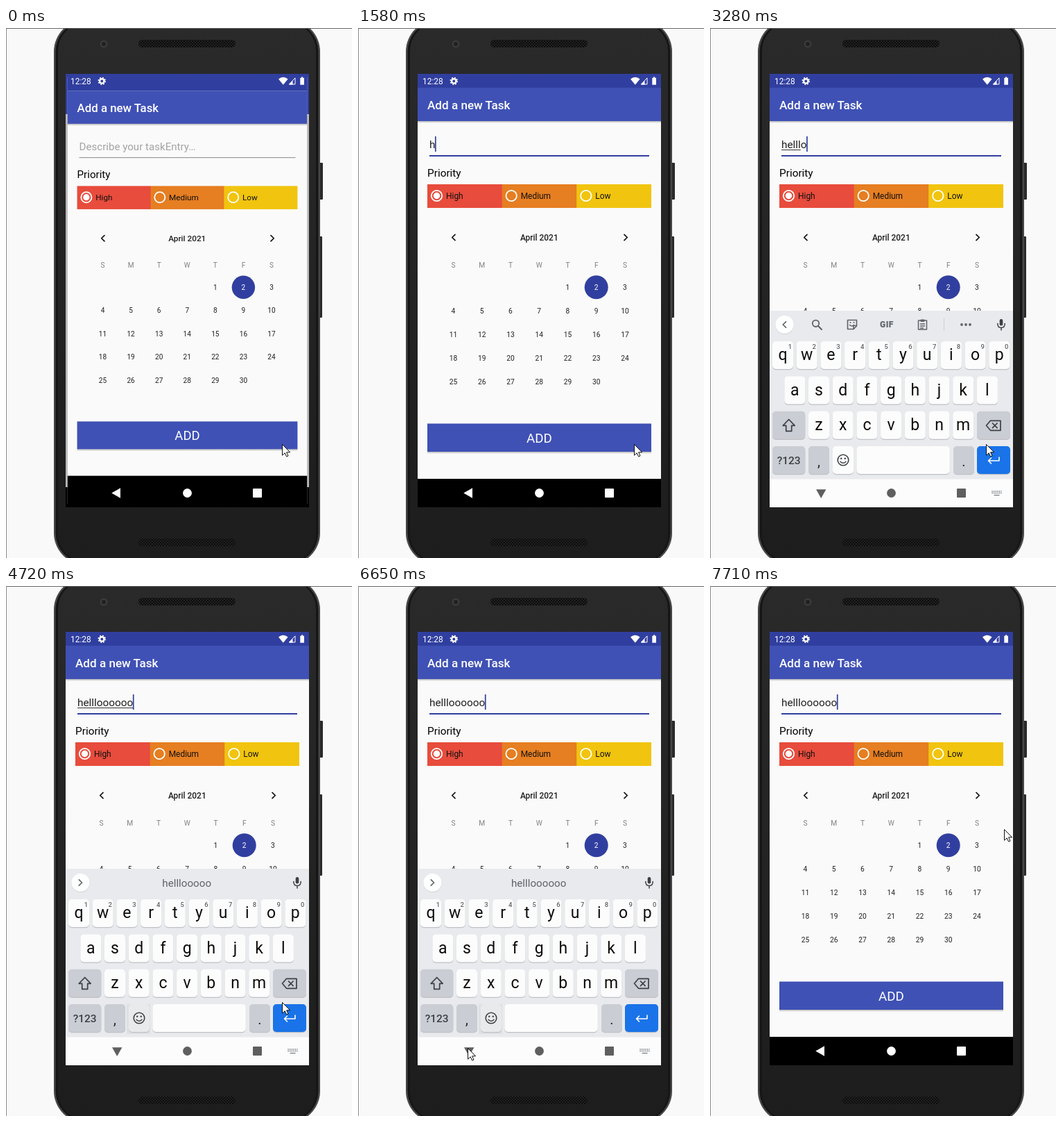
Animation of 499 by 763 pixels, one loop 8 s. Source, as an HTML page:

```html
<!DOCTYPE html>
<html lang="en">
<head>
<meta charset="utf-8">
<title>Add a new Task</title>
<style>
html, body { margin: 0; width: 100%; height: 100%; overflow: hidden; background: #f9f9f9; }
svg { display: block; width: 499px; height: 763px; }
text { font-family: Roboto, sans-serif; white-space: pre; }
.line { fill: none; stroke-linecap: round; stroke-linejoin: round; }
</style>
</head>
<body>
<svg id="stage" viewBox="0 0 499 763" xmlns="http://www.w3.org/2000/svg"></svg>
<script>
const LOOP = 8000;
const WORD = 'helll' + 'o'.repeat(6);
const DP = 351 / 411;
const INK = '#5f6368';

// Step tables: [start ms, value, ...]
const typed = [[0, 0], [1580, 1], [1720, 2], [2120, 3], [2390, 4], [2850, 5], [3280, 6],
  [3730, 7], [4010, 8], [4290, 9], [4440, 10], [4720, 11]];
const zoom = [[0, .984], [130, .995], [250, 1]];
const keyboard = [[0, 0, 0], [2850, 28, .45], [2980, 4, .92], [3130, 0, 1],
  [6780, 28, .58], [6930, 45, .12], [7060, 0, 0]];
const backTurn = [[0, 0], [1720, -20], [1850, -45], [2120, -70], [2250, -90],
  [6780, -75], [6930, -35], [7060, 0]];
const caretOn = [[0, 0], [1580, 1], [5150, 0], [5670, 1], [6150, 0], [6650, 1], [7130, 0], [7590, 1]];
const pointer = [[0, 398, 599], [4870, 440, 585], [5000, 484, 558], [5130, 470, 562],
  [5270, 400, 582], [5400, 320, 606], [5540, 240, 630], [5670, 185, 643], [5940, 178, 654],
  [6080, 164, 662], [6240, 158, 665], [7060, 190, 640], [7190, 250, 560], [7330, 325, 470],
  [7460, 392, 400], [7590, 424, 367], [7710, 424, 350]];

const at = (table, t) => table.findLast(([start]) => start <= t)?.slice(1) ?? table[0].slice(1);

const rect = (x, y, w, h, fill, rx = 0, more = '') =>
  `<rect x="${x}" y="${y}" width="${w}" height="${h}" rx="${rx}" fill="${fill}" ${more}/>`;
const disc = (x, y, r, fill, more = '') => `<circle cx="${x}" cy="${y}" r="${r}" fill="${fill}" ${more}/>`;
const ring = (x, y, r, color, width, more = '') =>
  disc(x, y, r, 'none', `stroke="${color}" stroke-width="${width}" ${more}`);
const shape = (d, fill, more = '') => `<path d="${d}" fill="${fill}" ${more}/>`;
const line = (d, color = INK, width = 1.7, more = '') =>
  `<path class="line" d="${d}" stroke="${color}" stroke-width="${width}" ${more}/>`;
const text = (x, y, size, fill, str, more = '') =>
  `<text x="${x}" y="${y}" font-size="${size}" fill="${fill}" ${more}>${str}</text>`;
const mid = (x, y, size, fill, str, more = '') => text(x, y, size, fill, str, `text-anchor="middle" ${more}`);
const medium = 'font-weight="500"';
const group = (id, body, more = '') => `<g id="${id}" ${more}>${body}</g>`;

function phone() {
  const speaker = y => rect(191, y, 140, 11, '#0d0d0d', 5.5) + rect(191, y, 140, 11, 'url(#mesh)', 5.5);
  return rect(452, 194, 5, 53, '#2b2b2b', 1) + rect(452, 300, 4, 117, '#2b2b2b', 1) +
    rect(69, -12, 384, 785, '#474747', 46) + rect(71.5, -10, 379, 781, '#161616', 44) +
    rect(75, -8, 372, 777, 'url(#body)', 41) +
    disc(141, 23, 5.5, '#3b3b3b') + disc(141, 23, 3, '#202024') +
    speaker(17) + speaker(735);
}

function calendar() {
  const col = i => 137.5 + 41.25 * i;
  let out = line('M140 297.3l-4.3 4.2 4.3 4.2', '#111') + line('M384 297.3l4.3 4.2-4.3 4.2', '#111') +
    mid(261.3, 305.5, 14 * DP, '#212121', 'April 2021', medium) +
    disc(343.7, 373.2, 17, '#303f9f');
  [...'SMTWTFS'].forEach((d, i) => out += mid(col(i), 344.5, 12 * DP, '#808080', d));
  for (let day = 1; day <= 30; day++) {
    const cell = day + 3;
    out += mid(col(cell % 7), 377 + 34 * Math.floor(cell / 7), 12 * DP, day === 2 ? '#fff' : '#212121', day);
  }
  return out;
}

function priorities() {
  const w = 323 / 3;
  return [['High', '#e74c3c'], ['Medium', '#e67e22'], ['Low', '#f1c40f']].map(([name, color], i) => {
    const x = 100 + w * i;
    return rect(x, 225, w + (i < 2 ? .5 : 0), 34, color) + ring(x + 13.5, 241.5, 7.7, '#fff', 1.8) +
      (i ? '' : disc(x + 13.5, 241.5, 4.7, '#fff')) + text(x + 27, 246.2, 14 * DP, '#111', name);
  }).join('');
}

function app() {
  return rect(86, 66, 351, 624, '#fafafa') +
    rect(86, 134, 351, 3, 'url(#shade)') +
    rect(86, 66, 351, 20, '#303f9f') + rect(86, 86, 351, 48, '#3f51b5') +
    text(100, 117, 20 * DP, '#fff', 'Add a new Task', medium) +
    text(103, 173, 18 * DP, '#a3a3a3', 'Describe your taskEntry…', 'id="hint"') +
    text(103, 173, 18 * DP, '#212121', '', 'id="entry"') +
    rect(103, 175, 0, 1, '#333', 0, 'id="composing"') +
    rect(103, 183, 317, 1, '#888', 0, 'id="fieldLine"') +
    rect(103, 156, 1.7, 22, '#303f9f', 0, 'id="caret"') +
    text(100, 213.7, 18 * DP, '#000', 'Priority') +
    priorities() + calendar() +
    rect(100, 610, 323, 3, 'url(#shade)') + rect(100, 569.5, 323, 40.5, '#3f51b5') +
    mid(261.5, 597, 22 * DP, '#fff', 'ADD') +
    rect(86, 649, 351, 41, '#000');
}

function statusIcons() {
  return text(93, 81, 14 * DP, '#fff', '12:28') +
    ring(138.3, 76.4, 3.2, '#fff', 2.4) + ring(138.3, 76.4, 4.8, '#fff', 1.9, 'stroke-dasharray="1.9 1.87"') +
    shape('M393 73.4Q399.8 68.2 406.6 73.4L399.8 81.8z', '#fff') +
    line('M408.7 81H417V72.3z', '#fff', 1) + shape('M408.2 81.4L413.5 76V81.4z', '#fff') +
    shape('M424.3 71.8h1.7v-1.3h2.2v1.3h1.7v10h-5.6z', '#fff');
}

function keys() {
  const key = (x, y, w, fill = '#fcfcfc', more = '') =>
    rect(x, y + 1.2, w, 40, '#bfc1c5', 5) + rect(x, y, w, 40, fill, 5, more);
  const grey = '#cbcdd4';
  let out = '';
  [['qwertyuiop', 90, 451], ['asdfghjkl', 107.3, 501.5], ['zxcvbnm', 142, 551.7]].forEach(([row, left, y], r) =>
    [...row].forEach((ch, i) => {
      const x = left + 34.7 * i;
      out += key(x, y, 30) + mid(x + 15, y + 27, 23, '#0c0c0c', ch);
      if (!r) out += mid(x + 25.5, y + 10.5, 9.5, INK, (i + 1) % 10, medium);
    }));
  out += key(90, 551.7, 47.3, grey) + line('M113.7 563.5l-8.5 8.8h4.5v8h8v-8h4.5z', '#3c4043') +
    key(385, 551.7, 48, grey) + line('M398.5 572.3l6-7h14.5v14h-14.5zM407.5 569l6.6 6.6m0-6.6l-6.6 6.6', '#3c4043') +
    key(90, 602, 47.3, grey) + mid(113.7, 628, 15.5, '#3c4043', '?123', medium) +
    key(142, 602, 30, grey) + mid(157, 631, 20, '#222', ',') +
    rect(174, 602, 34, 43, '#dfe0e3', 0, 'id="emojiBack"') + key(177, 602, 30, '#fcfcfc', 'id="emoji"') +
    ring(192, 622, 7.8, '#3c4043', 1.6) + disc(189.2, 619.8, 1.2, '#3c4043') + disc(194.8, 619.8, 1.2, '#3c4043') +
    line('M188 624.2q4 4.2 8 0', '#3c4043', 1.5) +
    key(211.3, 602, 134.5) + key(351, 602, 30, grey) + mid(366, 631, 20, '#222', '.') +
    key(385, 602, 48, '#1a73e8') + line('M417 618v5h-15.5m4-4l-4 4 4 4', '#fff', 1.6);
  return out;
}

function tools() {
  return ring(152.5, 425.3, 4.7, INK, 1.8) + line('M156 429l5 5', INK, 2) +
    line('M198.5 420.5h13v8.5l-4.5 4.5h-8.5zM211.3 428.5h-4.3v4.8M201.5 427.5q3 3 6 0', INK, 1.6) +
    disc(202.5, 424, 1, INK) + disc(207.5, 424, 1, INK) +
    mid(255, 431.3, 12, INK, 'GIF', 'font-weight="900" letter-spacing=".5"') +
    line('M300.5 421h12v13h-12zM303.5 426h6m-6 3h6m-6 3h4', INK, 1.5) + rect(303.5, 419.5, 6, 3.5, INK, 1) +
    rect(337, 418, 1, 18, '#cdcfd3') +
    [363, 369, 375].map(x => disc(x, 427, 1.9, INK)).join('');
}

function inputPanel() {
  return rect(86, 407, 351, 243, '#e8eaed') + rect(86, 649.5, 351, 69, '#fcfcfc') +
    disc(107.5, 428, 13, '#cfd1d4') + disc(107.5, 427, 13, '#fff') +
    line('M109.5 422.8l-4.3 4.2 4.3 4.2', INK, 1.7, 'id="chevron"') +
    group('tools', tools()) + mid(260.7, 433, 15.2, INK, '', 'id="suggestion"') +
    rect(417.7, 419, 4.6, 9.5, '#3c4043', 2.3) + line('M414.8 425.5q0 6 5.2 6t5.2-6M420 431.5v3.5', '#3c4043', 1.5) +
    keys() +
    line('M407 667h13M407 669.5h13', INK, 1.4, 'stroke-dasharray=".3 2.3"') + line('M410 672.5h7', INK, 1.2);
}

function build() {
  const fade = (id, a, b, more = '') => `<linearGradient id="${id}" x2="0" y2="1">
    <stop offset="0" ${a}/><stop offset="1" ${b}/></linearGradient>`;
  stage.innerHTML = `<defs>
    ${fade('body', 'stop-color="#2a2a2a"', 'stop-color="#1d1d1d"')}
    ${fade('shade', 'stop-color="#000" stop-opacity=".28"', 'stop-color="#000" stop-opacity="0"')}
    <pattern id="mesh" width="4" height="4" patternUnits="userSpaceOnUse">
      ${disc(1, 1, .8, '#3a3a3a') + disc(3, 3, .8, '#3a3a3a')}</pattern>
    <clipPath id="screen">${rect(86, 66, 351, 624, '#000')}</clipPath></defs>` +
    rect(0, 0, 499, 763, '#f9f9f9') + phone() +
    rect(0, 0, 499, 1, '#666') + rect(0, 0, 1, 763, '#8a8a8a') +
    group('display',
      rect(86, 66, 351, 58, '#303f9f') + rect(86, 124, 351, 537, '#b8b8b8') + rect(86, 661, 351, 29, '#000') +
      group('app', app()) + group('panel', inputPanel()) +
      rect(115, 653, 90, 33, '#000', 16, 'id="ripple" opacity=".15"') +
      group('nav', shape('M152.3 669.5L165 662.3V676.7z', 'inherit', 'id="back"') +
        disc(261.5, 669.5, 6.4, 'inherit') + rect(356, 663, 13, 13, 'inherit', 1)) +
      statusIcons(), 'clip-path="url(#screen)"') +
    group('mouse', shape('M.5.5V16.2L4.2 12.8 6.6 18 9 17 6.6 11.8H11.6z', '#fff', 'stroke="#111" stroke-width="1"'));
}

build();
const el = Object.fromEntries([...stage.querySelectorAll('[id]')].map(n => [n.id, n]));
const set = (name, attrs) => Object.entries(attrs).forEach(([k, v]) => el[name].setAttribute(k, v));
const show = (name, on) => set(name, { visibility: on ? 'inherit' : 'hidden' });

function render(t) {
  const [count] = at(typed, t);
  const [scale] = at(zoom, t);
  const [drop, alpha] = at(keyboard, t);
  const [x, y] = at(pointer, t);
  const focused = count > 0;
  const suggesting = t >= 3430;

  set('app', { transform: `translate(261.5 378) scale(${scale}) translate(-261.5 -378)` });
  show('hint', !focused);
  el.entry.textContent = WORD.slice(0, count);
  const width = focused ? el.entry.getComputedTextLength() : 0;
  set('fieldLine', { height: focused ? 2 : 1, fill: focused ? '#303f9f' : '#888' });
  set('caret', { x: 103 + width - .5 });
  show('caret', at(caretOn, t)[0]);

  const marked = suggesting ? count : Math.min(count, 5);
  const composing = t >= 2850 && t < 6650;
  set('composing', { width: composing ? el.entry.getSubStringLength(0, marked) : 0 });

  set('panel', { transform: `translate(0 ${drop})`, opacity: alpha });
  show('panel', alpha > 0);
  show('tools', !suggesting);
  set('chevron', { transform: suggesting ? 'matrix(-1 0 0 1 214.8 0)' : '' });
  el.suggestion.textContent = suggesting ? WORD.slice(0, at(typed, t - 150)[0]) : '';
  const flat = suggesting && t < 6780;
  show('emojiBack', flat);
  set('emoji', { fill: flat ? '#e9eaec' : '#fcfcfc' });

  show('ripple', t >= 6780 && t < 7060);
  set('nav', { fill: alpha > .9 ? '#5f5f5f' : '#fff' });
  set('back', { transform: `rotate(${at(backTurn, t)} 160 669.3)` });
  set('mouse', { transform: `translate(${x} ${y})` });
}

const origin = performance.now();
function tick() {
  render((performance.now() - origin) % LOOP);
  requestAnimationFrame(tick);
}
tick();
</script>
</body>
</html>
```
